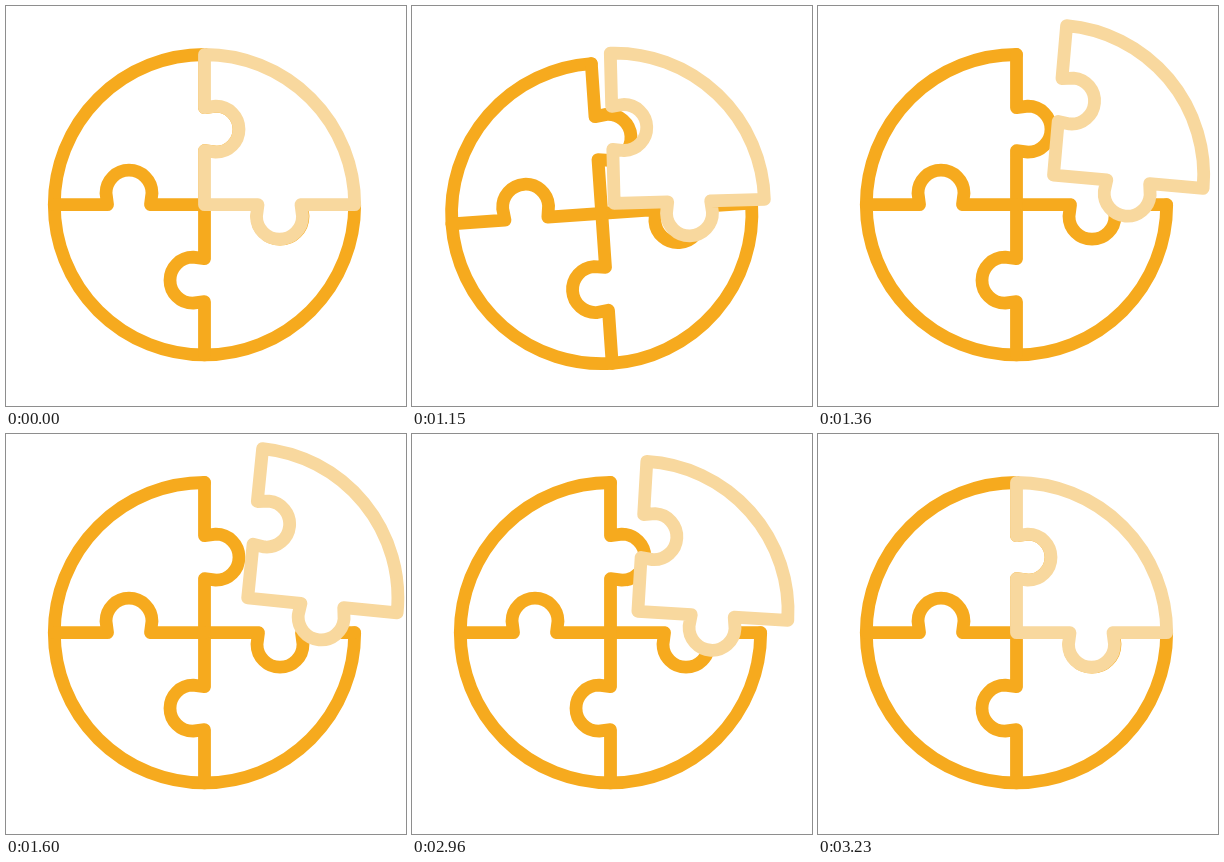
Animation of 400x400 px, one loop 3260 ms. Source, as an HTML page:

```html
<!DOCTYPE html>
<html lang="en">
<head>
<meta charset="utf-8">
<title>Puzzle circle</title>
<style>
  html, body { margin: 0; width: 100%; height: 100%; overflow: hidden; background: #fff; }
  svg { display: block; width: 100%; height: 100%; }
  path, use { fill: none; stroke-width: 12.8; stroke-linecap: round; stroke-linejoin: round; }
  #base { stroke: #f6aa1e; }
  #piece path { fill: #fff; stroke: #f8d89e; }
</style>
</head>
<body>
<svg viewBox="0 0 400 400">
  <defs>
    <path id="spoke" d="M0-150.2V-97L11.5-98.5A23 23 0 0 1 11.5-52.5L0-54V0"/>
  </defs>
  <g id="base">
    <path d="M150.2 0A150.2 150.2 0 1 1 0-150.2"/>
    <use href="#spoke"/>
    <use href="#spoke" transform="rotate(90)"/>
    <use href="#spoke" transform="rotate(180)"/>
    <use href="#spoke" transform="rotate(270)"/>
  </g>
  <g id="piece">
    <path d="M0-150.2V-97L11.5-98.5A23 23 0 0 1 11.5-52.5L0-54V0H53.5L52 11.5A23 23 0 0 0 98 11.5L96.5 0H150.2A150.2 150.2 0 0 0 0-150.2Z"/>
  </g>
</svg>
<script>
  const LOOP = 3260, STEP = 30, STEPS = 20;
  const PEAK = 3.3, SETTLE = 9;
  const CENTER = [198.5, 198.7];
  const REST = [0, 0, 0], PULL = [-11, 11, -5], OUT = [43.2, -34.7, 5.7]; // x, y, degrees

  const base = document.getElementById('base');
  const piece = document.getElementById('piece');

  const clamp = (v, lo, hi) => Math.min(hi, Math.max(lo, v));
  const mix = (a, b, p) => a + (b - a) * p;
  const easeOut = (s, n) => 1 - (1 - s) ** n;
  const blend = (a, b, p, turn = p) => a.map((v, i) => mix(v, b[i], i < 2 ? p : turn));

  // Steps out, hold, then the same steps back
  function stepAt(t) {
    const out = Math.floor((t - 1000) / STEP);
    const back = Math.floor((t - 2630) / STEP);
    return clamp(out, 0, STEPS) - clamp(back, 0, STEPS);
  }

  function basePose(k) {
    if (k < PEAK) return blend(REST, PULL, k / PEAK);
    const s = clamp((k - PEAK) / (SETTLE - PEAK), 0, 1);
    return blend(PULL, REST, (1 - Math.cos(Math.PI * s)) / 2);
  }

  function piecePose(k) {
    if (k < PEAK) return basePose(k);
    const s = (k - PEAK) / (STEPS - PEAK);
    return blend(PULL, OUT, easeOut(s, 2.95), easeOut(s, 3.7));
  }

  function place(el, [x, y, deg]) {
    el.setAttribute('transform', `translate(${CENTER[0] + x} ${CENTER[1] + y}) rotate(${deg})`);
  }

  function draw(t) {
    const k = stepAt(t % LOOP);
    place(base, basePose(k));
    place(piece, piecePose(k));
  }

  let start;
  function tick(now) {
    start ??= now;
    draw(now - start);
    requestAnimationFrame(tick);
  }
  draw(0);
  requestAnimationFrame(tick);
</script>
</body>
</html>
```
